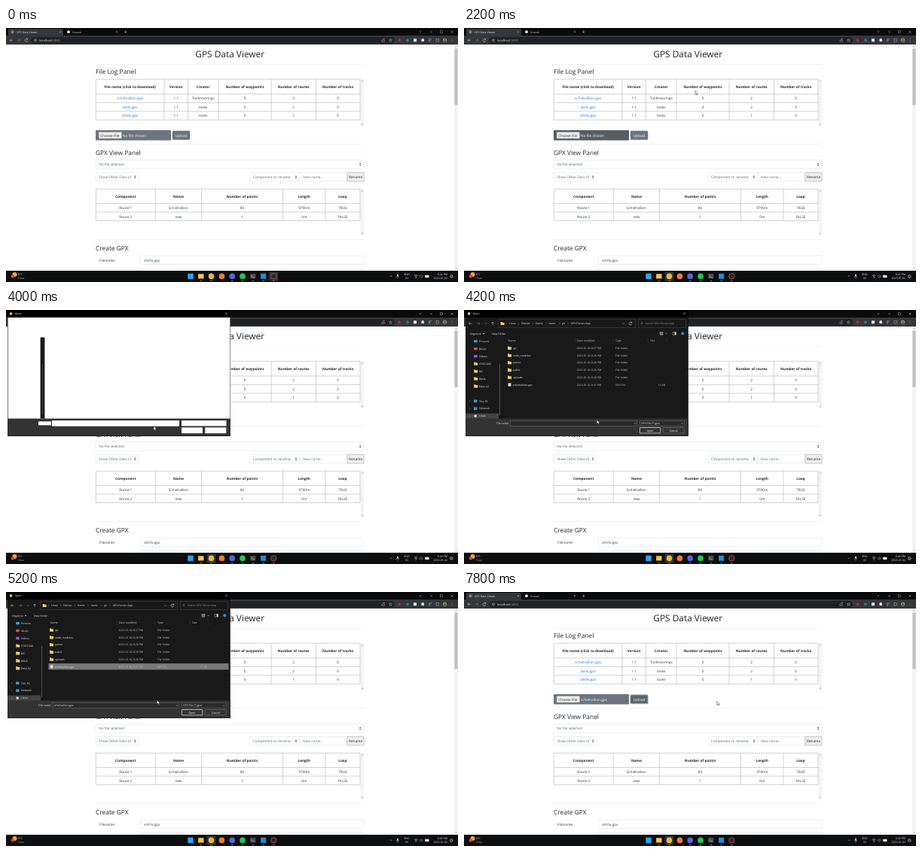
An HTML page that plays this animation: 600 by 338 pixels, repeating every 8 s.

```html
<!DOCTYPE html>
<html lang="en">
<head>
<meta charset="utf-8">
<title>GPS Data Viewer</title>
<style>
  html, body { margin: 0; width: 100%; height: 100%; overflow: hidden; background: #fff; }
  svg { display: block; width: 100%; height: 100%; }
  text { font-family: "Open Sans", "Noto Sans", sans-serif; text-rendering: geometricPrecision; white-space: pre; }
</style>
</head>
<body>
<svg id="stage" viewBox="0 0 600 338" xmlns="http://www.w3.org/2000/svg"></svg>
<script>
const LOOP = 8000, STEP = 200;
const BODY = 4.72, INK = '#343a40', GREY = '#6c757d', LINE = '#a2a4a6';

// Drawing helpers
const rect = (x, y, w, h, fill, more = '') =>
  `<rect x="${x}" y="${y}" width="${w}" height="${h}" fill="${fill}" ${more}/>`;
const box = (x, y, w, h, fill, stroke, r = 0, sw = .4) =>
  rect(x, y, w, h, fill, `stroke="${stroke}" stroke-width="${sw}" rx="${r}"`);
const dot = (x, y, r, fill, more = '') => `<circle cx="${x}" cy="${y}" r="${r}" fill="${fill}" ${more}/>`;
const path = (d, stroke, sw = .5, fill = 'none') =>
  `<path d="${d}" fill="${fill}" stroke="${stroke}" stroke-width="${sw}"/>`;
const text = (x, y, s, size = BODY, fill = INK, anchor = 'start', weight = 400) =>
  `<text x="${x}" y="${y}" font-size="${size}" fill="${fill}" text-anchor="${anchor}" font-weight="${weight}">${s}</text>`;
const group = (id, content) => `<g id="${id}">${content}</g>`;
const cross = (x, y, r, c) => path(`M${x - r} ${y - r}l${2 * r} ${2 * r}m0 ${-2 * r}l${-2 * r} ${2 * r}`, c);
const chevron = (x, y, c, up = 0) => path(`M${x - 1.3} ${y + (up ? .6 : -.6)}l1.3 ${up ? -1.3 : 1.3} 1.3 ${up ? 1.3 : -1.3}`, c);
const arrow = (x, y, c, dir = 1) => path(`M${x + 2 * dir} ${y}h${-4 * dir}m${1.6 * dir} -1.6l${-1.6 * dir} 1.6 ${1.6 * dir} 1.6`, c, .55);
const reload = (x, y, c) => path(`M${x + 1.6} ${y - .9}a1.9 1.9 0 1 0 .2 1.5m0-3.2v1.7h-1.7`, c, .55);
const folder = (x, y) => path(`M${x} ${y}h2l.7.7h2.3v3.4h-5z`, 'none', 0, '#f5cf62');
const sorter = (x, y) => path(`M${x - 1.2} ${y - .4}l1.2-1.5 1.2 1.5zm0 .9l1.2 1.5 1.2-1.5z`, 'none', 0, INK);
const rule = y => rect(119, y, 356, .4, '#dfe1e3');
const heading = (y, s) => text(119, y, s, 8.4, '#212529', 'start', 500);

function table(cols, rows, lines) {
  const [left, right] = [cols[0], cols.at(-1)], [top, bottom] = [lines[0], lines.at(-1)];
  let out = path(lines.map(y => `M${left} ${y}H${right}`).join('') +
                 cols.map(x => `M${x} ${top}V${bottom}`).join(''), LINE, .5);
  rows.forEach((cells, r) => cells.forEach((s, c) => {
    const link = s.endsWith('.gpx');
    out += text((cols[c] + cols[c + 1]) / 2, (lines[r] + lines[r + 1]) / 2 + 1.75, s, BODY,
      link ? '#1a7cf0' : r ? INK : '#212529', 'middle', r ? 400 : 700);
  }));
  return out;
}

function scroller(x, y, w, h) {
  const m = x + w / 2, a = '#9a9a9a';
  return rect(x, y, w, h, '#f4f4f4') +
    path(`M${m - 1.1} ${y + 3.2}l1.1-1.4 1.1 1.4zM${m - 1.1} ${y + h - 3.2}l1.1 1.4 1.1-1.4z`, 'none', 0, a);
}

function browser() {
  const pale = '#d4d6d8';
  return rect(0, 0, 600, 11, '#0b0b0c') + rect(0, 10, 600, 12, '#35363a') +
    rect(3, 1, 73, 10, '#35363a', 'rx="1.6"') +
    dot(8.5, 5.3, 1.7, 'none', `stroke="${pale}" stroke-width=".5"`) +
    path('M6.8 5.3h3.4M8.5 3.6v3.4', pale, .35) +
    text(14, 6.6, 'GPS Data Viewer', 3.6, '#e8eaed') + cross(72, 5.2, .9, pale) +
    dot(83, 5.2, 1.9, '#f2f2f2') + text(88, 6.6, 'Gravok', 3.6, pale) + cross(147, 5.2, .9, pale) +
    path('M157 5.2h3.4m-1.7-1.7v3.4', pale) +
    chevron(550, 5, pale) + path('M563 5.2h3', pale) + box(576.7, 3.8, 2.7, 2.7, 'none', pale) + cross(592, 5.2, 1.4, pale) +
    arrow(7, 16.2, pale) + arrow(17, 16.2, '#85878a', -1) + reload(27, 16.2, pale) +
    rect(33, 11.9, 483, 8.8, '#202124', 'rx="4.4"') +
    dot(39, 16.3, 1.6, 'none', `stroke="${pale}" stroke-width=".5"`) + path('M39 15.9v1.4', pale) +
    text(44, 17.8, 'localhost<tspan fill="#9aa0a6">:3000</tspan>', 4.15, '#e8eaed') +
    path('M499 16v2h3.2v-2m-2.5.4c0-1.6 1-1.8 2.6-1.8m-.9-.9l1 .9-1 .9', pale, .45) +
    path('M510.5 14.2l.6 1.4 1.5.1-1.1 1 .4 1.5-1.4-.8-1.4.8.4-1.5-1.1-1 1.5-.1z', pale, .4) +
    dot(522.5, 16.2, 1.9, '#a9303a') + dot(533, 16.2, 1.9, '#2c7a9f') +
    rect(541, 14.2, 4, 4, '#d7e8f5') + rect(551.5, 14.6, 3.5, 3.5, '#e4e5e6', 'rx=".6"') + dot(553.2, 14.6, .9, '#e4e5e6') +
    path('M561 14.8h4m-4 1.5h2.5m-2.5 1.5h2', pale) + box(571, 14.3, 3.6, 3.7, 'none', pale) +
    dot(582.5, 16.2, 2.6, '#8d9b7a') + path('M580.6 18c.2-2 3.6-2 3.8 0z', 'none', 0, '#4c4034') + dot(582.5, 15.3, .9, '#4c4034') +
    [-1.5, 0, 1.5].map(d => dot(592, 16.2 + d, .4, pale)).join('');
}

function page() {
  const select = (x, y, w, s) => box(x, y, w, 11.4, '#fff', '#ced4da', 1.2) +
    text(x + 4, y + 7.4, s, BODY, '#5f676e') + sorter(x + w - 5, y + 5.7);
  return text(297.2, 39.3, 'GPS Data Viewer', 11.9, '#212529', 'middle', 500) + rule(48) +
    heading(61.3, 'File Log Panel') + scroller(470.5, 68, 4.8, 63) +
    table([119.3, 210, 241.4, 282, 352, 411.3, 470], [
      ['File name (click to download)', 'Version', 'Creator', 'Number of waypoints', 'Number of routes', 'Number of tracks'],
      ['schiehallion.gpx', '1.1', 'Trailmoorings', '0', '2', '0'],
      ['dank.gpx', '1.1', 'tovex', '0', '2', '0'],
      ['allvfw.gpx', '1.1', 'tovex', '0', '1', '0']
    ], [68.2, 87.9, 99.4, 110.9, 122.3]) +
    `<rect id="picker" x="119" y="136" width="100" height="13.5" rx="1.2"/>` +
    box(123.2, 138.6, 30.3, 8.4, '#efefef', '#9a9a9a', .5) + text(125.3, 144.6, 'Choose File', BODY, '#222') +
    `<text id="chosen" x="155" y="144.5" font-size="4.7" fill="#fff"></text>` +
    `<rect id="upload" x="220.8" y="136.8" width="23.4" height="12" rx="1.2"/>` +
    text(232.5, 144.5, 'Upload', BODY, '#fff', 'middle') + rule(154) +
    heading(168.6, 'GPX View Panel') + select(119.2, 175.8, 356, 'No file selected') +
    select(119.2, 192.5, 57, 'Show Other Data of') + select(323.7, 192.5, 66.3, 'Component to rename') +
    box(390, 192.5, 61.3, 11.4, '#fff', '#ced4da') + text(394, 199.9, 'New name...', BODY, GREY) +
    box(453, 192.3, 22.2, 11.8, '#efefef', '#767676', .7) + text(464.1, 199.9, 'Rename', BODY, '#222', 'middle') +
    scroller(470.5, 214, 4.8, 62) +
    table([119.3, 198.3, 259.6, 367.5, 424, 470], [
      ['Component', 'Name', 'Number of points', 'Length', 'Loop'],
      ['Route 1', 'Schiehallion', '80', '9790m', 'TRUE'],
      ['Route 2', 'new', '1', '0m', 'FALSE']
    ], [214.3, 233.5, 245, 256.5]) +
    rule(281) + heading(295.7, 'Create GPX') + text(124, 310.6, 'Filename:') +
    box(178.6, 303, 296.6, 11.6, '#fff', '#ced4da', 1.2) + text(183, 310.6, 'allvfw.gpx', BODY, '#495057') +
    box(178.6, 319.8, 296.6, 11.6, '#fff', '#ced4da', 1.2) +
    scroller(595, 22, 5, 301) + rect(595.4, 27.5, 4.2, 75, '#c1c1c1');
}

function taskbar() {
  const pale = '#e6e6e6', label = (x, y, s, a) => text(x, y, s, 3.55, pale, a);
  return rect(0, 323, 600, 15, '#0d0e10') +
    dot(11.5, 328, 3, '#f2a33a') + dot(8.8, 330.5, 2.2, '#d8442f') +
    label(16, 328.8, '0°C') + text(16, 333.8, 'Clear', 3.55, '#a8a8a8') +
    group('focusA', rect(349.4, 324.6, 11.8, 11.8, '#303236', 'rx="1.2"')) +
    group('focusB', rect(266.6, 324.6, 11.8, 11.8, '#303236', 'rx="1.2"')) +
    rect(241.3, 326.7, 7.4, 7.4, '#29a5ee') + rect(255.1, 327.3, 7.4, 6.2, '#f4c64e') +
    dot(272.5, 330.4, 3.8, '#e5b93c') + dot(286.4, 330.4, 3.8, '#f4792b') +
    dot(300.2, 330.4, 3.8, '#5865d8') + dot(314, 330.4, 3.8, '#20c65b') +
    rect(324.2, 327, 7.2, 6.6, '#4a4d50', 'rx=".8"') + path('M325.5 329l1.3 1.2-1.3 1.2m2 .4h2', '#fff') +
    rect(338.1, 326.8, 7, 7, '#238bd2') + dot(355.3, 330.4, 3.7, '#2b2729', 'stroke="#b9545a" stroke-width=".8"') +
    [259, 272.5, 300.2, 314, 328, 341.6, 355.3].map(x => rect(x - 1.3, 336, 2.6, .7, '#9a9a9a')).join('') +
    chevron(511, 330.4, pale, 1) + rect(519.2, 327.8, 1.6, 3.2, pale, 'rx=".8"') + path('M518.4 330.2c0 2.6 3.2 2.6 3.2 0m-1.6 2v1.1', pale, .4) +
    label(532, 329, 'ENG', 'middle') + label(532, 334, 'US', 'middle') +
    path('M541.8 329.6q2.4-2.2 4.8 0m-3.7 1.3q1.3-1.1 2.6 0', pale, .6) + dot(544.2, 332.2, .6, pale) +
    path('M549 329.7h1l1.4-1.3v4.2l-1.4-1.3h-1z', pale, .3) + path('M552.6 329q1.2 1.5 0 3', pale, .4) +
    box(556.3, 329, 5, 3, pale, pale, .6) +
    label(586, 329, '6:42 PM', 'end') + label(586, 334, '2023-01-02', 'end') +
    dot(591.3, 330.5, 1.9, '#3a3d41', `stroke="${pale}" stroke-width=".5"`);
}

function fileDialog() {
  const small = (x, y, s, c = '#e4e4e4', a) => text(x, y, s, 3.55, c, a);
  const frame = rect(2, 0, 295.8, 168, '#191919') + rect(2, 0, 295.8, 10, '#000') +
    dot(6.6, 4.9, 1.9, '#e5b93c') + small(11.5, 6.3, 'Open') + cross(292.5, 4.7, 1.3, '#ddd') +
    rect(2, 144.5, 295.8, 23, '#333');
  const blank = rect(2.6, 10, 294.8, 134.5, '#fff') + rect(45.6, 36.5, 5.8, 108, '#191919') + rect(48.3, 72, .5, 68, '#666') +
    [[43, 148.3, 17, 5], [61, 147, 169, 7.7], [233, 147, 59.5, 7.4], [233, 156.3, 28, 7.8], [264.3, 156.3, 28, 7.8]]
      .map(b => rect(...b, '#fff')).join('');

  const crumbs = [[60, 'Linux'], [76, 'Debian'], [95, 'home'], [112.5, 'tovex'], [130, 'git'], [141.5, 'GPX-Parser-App']];
  let full = arrow(8.5, 18, '#ddd') + arrow(19, 18, '#777', -1) + chevron(29, 18, '#aaa') + path('M38 20v-4m-1.6 1.6l1.6-1.6 1.6 1.6', '#ddd') +
    box(45.8, 12.2, 182, 11.6, '#191919', '#555') + folder(48.6, 16) +
    crumbs.map(([x, s]) => path(`M${x - 4} 16.8l1.1 1.2-1.1 1.2`, '#aaa', .4) + small(x, 19.3, s)).join('') +
    chevron(211.5, 18, '#bbb') + reload(221, 18, '#ddd') +
    box(231.6, 12.2, 63, 11.6, '#191919', '#555') + dot(236, 17.6, 1.1, 'none', 'stroke="#aaa" stroke-width=".4"') +
    small(240.5, 19.3, 'Search GPX-Parser-App', '#9a9a9a') +
    small(8, 32.8, 'Organise') + path('M24.8 31l1.2 1.3 1.2-1.3z', 'none', 0, '#ddd') + small(37, 32.8, 'New folder') +
    box(260, 29.3, 4, 3.8, '#666', '#ccc') + chevron(268.5, 31.3, '#ccc') + box(277, 29.3, 4.6, 3.8, 'none', '#ccc') +
    rect(279.4, 29.3, 2.2, 3.8, '#ccc') + dot(290.3, 31.3, 2.1, '#2e8ee0');
  [[58.5, 'Name'], [150, 'Date modified'], [201, 'Type'], [247, 'Size']].forEach(([x, s]) => { full += small(x, 42.3, s, '#ccc'); });
  full += path('M148 38v6m50-6v6m46-6v6m25-6v6', '#444', .4);

  const side = [['Pictures', '#3aa0e0'], ['Music', '#d8524a'], ['Videos', '#8b62d8'], ['STAT2040'], ['MC'], ['Work'], ['Data A2'],
    null, ['This PC', '#3aa0e0'], ['Network', '#3aa0e0'], ['Linux', '#e8e8e8']];
  full += rect(2, 137.6, 44, 6.9, '#444');
  side.forEach((item, i) => {
    if (!item) return;
    const y = 41.6 + i * 9.95, root = i > 7, x = root ? 13 : 13.2;
    full += (item[1] ? (i === 10 ? dot(x + 2.2, y, 1.9, item[1]) : rect(x, y - 1.7, 4.4, 3.4, item[1])) : folder(x, y - 2)) +
      small(20, y + 1.3, item[0]) + (root ? path(`M7 ${y - 1.2}l1.1 1.2-1.1 1.2`, '#aaa', .4) : '');
  });
  full += rect(47, 72, .6, 68, '#777');

  const files = [['.git', '8:27'], ['node_modules', '8:20'], ['parser', '8:20'], ['public', '8:26'], ['uploads', '8:20'], ['schiehallion.gpx', '8:31']];
  full += group('picked', rect(56.5, 95, 239, 8.4, '#777'));
  files.forEach(([name, at], i) => {
    const y = 50.6 + i * 9.75, file = i === 5;
    full += (file ? box(58.8, y - 2, 3.4, 4, '#e9eef2', '#8fa5b5') : folder(58, y - 2)) + small(64.5, y + 1.2, name) +
      small(149.5, y + 1.2, `2023-01-02 ${at} PM`, '#c4c4c4') + small(201, y + 1.2, file ? 'GPX File' : 'File folder', '#c4c4c4') +
      (file ? small(267, y + 1.2, '15 KB', '#c4c4c4', 'end') : '');
  });
  full += small(60, 152.4, 'File name:', '#e4e4e4', 'end') +
    box(61.2, 147.4, 168.6, 7, '#2b2b2b', '#777') + group('typed', small(63, 152.3, 'schiehallion.gpx')) + chevron(227, 151, '#ccc') +
    box(233.2, 147.4, 59, 7, '#2b2b2b', '#777') + small(235, 152.3, 'GPX File (*.gpx)') + chevron(289.5, 151, '#ccc') +
    box(233.4, 156.5, 27.4, 7.4, '#333', '#eee', .4, .7) + small(247, 161.5, 'Open', '#fff', 'middle') +
    box(264.5, 156.5, 27.6, 7.4, '#333', '#999', .4) + small(278.3, 161.5, 'Cancel', '#fff', 'middle');
  return group('dialog', frame + group('blank', blank) + group('full', full));
}

const alertBox = () => group('alert', rect(229.8, 20.5, 140.4, 41.3, '#202124', 'rx="1.6"') +
  text(235.2, 31.5, 'localhost:3000 says', 4.25, '#e8eaed') +
  text(235.2, 40, 'schiehallion.gpx already exists', 3.55, '#e8eaed') +
  box(344.8, 46.8, 20.4, 9.4, '#6f97e4', '#2f55a8', 1.2, 1) + text(355, 52.9, 'OK', 3.6, '#202124', 'middle', 600));

const pointer = () => group('cursor',
  group('tip', path('M0 0V5.2L1.3 4.1 2.1 6 3 5.6 2.2 3.8H3.8z', '#222', .45, '#fff')) +
  group('hand', path('M0 .3q.6-.6 1.1 0V2.6L3.6 3.2q.6.2.5 1L3.5 6.6H.7L-1.3 4q.2-.8 1.3 0z', '#222', .45, '#fff')));

document.getElementById('stage').innerHTML =
  rect(0, 0, 600, 338, '#fff') + page() + browser() + taskbar() + alertBox() + fileDialog() + pointer();

// Pointer stops: time, x, y
const stops = [
  [200, 350, 320], [600, 270, 240], [1200, 185.6, 132.8], [1600, 58, 19], [1900, 80, 60], [2400, 430, 96],
  [2900, 400, 230], [3400, 314.2, 213.6], [3800, 141, 143], [4000, 196, 154.6], [4800, 70.2, 101.2],
  [5400, 246, 159], [5800, 234, 144], [6400, 234.6, 143.6], [6700, 234.6, 143.6], [7300, 354, 50],
  [7500, 354, 50], [7800, 335.6, 145.4], [8000, 335.6, 145.4]
];
const byId = id => document.getElementById(id);
const show = (id, on) => byId(id).setAttribute('visibility', on ? 'inherit' : 'hidden');

function place(t) {
  let i = 0;
  while (i < stops.length - 2 && t >= stops[i + 1][0]) i++;
  const [t0, x0, y0] = stops[i], [t1, x1, y1] = stops[i + 1];
  const p = Math.min(1, Math.max(0, (t - t0) / (t1 - t0))), e = p * p * (3 - 2 * p);
  return [x0 + (x1 - x0) * e, y0 + (y1 - y0) * e];
}

function render(t) {
  const within = (a, b) => t >= a && t < b;
  const [x, y] = place(t);
  const overUpload = x > 220 && x < 244 && y > 136 && y < 149;
  byId('cursor').setAttribute('transform', `translate(${x} ${y})`);
  show('cursor', t >= 200);
  show('hand', overUpload);
  show('tip', !overUpload);
  show('focusA', t < 200);
  show('focusB', t >= 200);
  show('dialog', within(4000, 5500));
  show('blank', t < 4200);
  show('full', t >= 4200);
  show('picked', t >= 4700);
  show('typed', t >= 4700);
  show('alert', within(6400, 7500));
  byId('chosen').textContent = t >= 5500 ? 'schiehallion.gpx' : 'No file chosen';
  byId('picker').setAttribute('fill', within(1400, 6000) ? '#565e64' : GREY);
  const upload = byId('upload');
  upload.setAttribute('fill', within(5700, 7500) ? '#50575d' : t >= 7500 ? '#5c646b' : GREY);
  upload.setAttribute('stroke', t >= 6400 ? '#b5babf' : 'none');
}

const start = performance.now();
function tick() {
  const t = (performance.now() - start) % LOOP;
  render(Math.floor(t / STEP) * STEP);
  requestAnimationFrame(tick);
}
tick();
</script>
</body>
</html>
```
